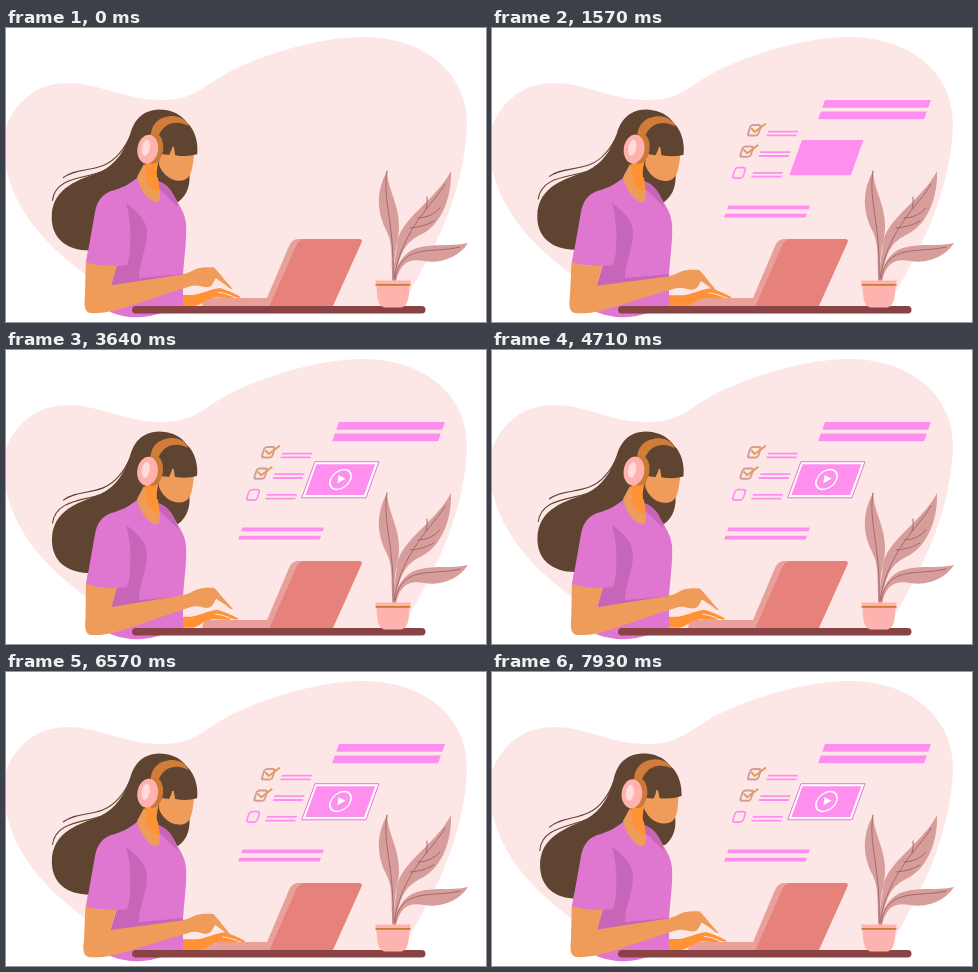
These frames come from a looping animation (480x294 px, 8 s). An HTML page:

```html
<!DOCTYPE html>
<html lang="en">
<head>
<meta charset="utf-8">
<title>Working at a laptop</title>
<style>
  html, body { margin: 0; width: 100%; height: 100%; overflow: hidden; background: #fff; }
  svg { display: block; width: 100vw; height: 100vh; }
  .skin { fill: #ef9c5a; }
  .hair { fill: #5f4531; }
  .shirt { fill: #df77d0; }
  .shade { fill: #c766b9; }
  .bright { fill: #ff9234; }
  .pink { fill: #ff8fee; }
  .leaf { fill: #d79d9b; }
  .vein { fill: none; stroke: #a4696b; stroke-linecap: round; }
  .strand { fill: none; stroke: #5f4531; stroke-width: 1.1; }
  .tick { fill: none; stroke: #e59c55; stroke-width: 2; stroke-linecap: round; stroke-linejoin: round; }
</style>
</head>
<body>
<svg viewBox="0 0 480 294" preserveAspectRatio="none">
  <path fill="#fde7e6" d="M-2 106C2 88 20 55 62 55C95 55 120 73 158 72C196 71 198 52 245 34C285 18 325 9 357 9C415 9 461 42 461 96C460 136 447 182 427 220C418 238 408 258 395 279H130C105 265 90 256 80 247C45 221 14 190 2 148C-2 134 -4 118 -2 106Z"/>

  <g id="board"></g>
  <path id="frame" fill="#fff" stroke="#df77d8" d="M309 111.7H373L360 147.8H295.7Z"/>
  <path id="panel" class="pink"/>
  <g id="play">
    <circle r="10" transform="skewX(-20)" fill="none" stroke="#fff" stroke-width="1.5"/>
    <path fill="#fff" d="M-2 -4.500L5 -.8L-3 3.700Z"/>
  </g>

  <path fill="#e9a09b" d="M196 279Q196 270 203 270H261L283 218Q286 211 292 211H305L275 279Z"/>
  <path fill="#e6817c" d="M263 279L290 218Q293 211 299 211H353Q357 211 355.500 214.500L326.500 279Z"/>

  <g data-head>
    <path class="hair" d="M153 81.500C134 82 127 95 124 106C118 124 110 136 95 144C75 152 46 159 46 190C46 211 61 223 84 223C113 222 135 200 146 173L172 174C182 167 185 155 183 142L189 110C181 89 170 82 153 81.500Z"/>
    <path class="strand" d="M57 150.500C73 138 96 147 113 126Q120 118 125 106M46.500 173.500C49 152 73 151 90 146Q112 140 121 117"/>
  </g>

  <g id="backHand">
    <path class="bright" d="M165 267L188 267C197 266 203 262 215 260C219 261 229 265 235.500 268.500Q236 270.500 232 269.500L217 265C223 267 227 268 229 269.500C223 271 214 269 208 270C200 271 197 278 188 278H165Z"/>
    <path fill="none" stroke="#fde7e6" d="M213 264.500Q218 264.500 227 268"/>
  </g>

  <path class="shirt" d="M131 150C122 157 114 161 105 163C95 167 91 174 89 184L80 235Q98 239 111 237L104 260V284Q128 294 156 285H177V248C178 230 181 211 180 196C179 184 173 177 168 168C164 161 160 156 152 153Z"/>
  <path class="shade" d="M120 175C131 183 142 193 141 207C140 224 133 235 133 250L177 246V251L104 260L111 237L122 235C126 214 125 193 120 175Z"/>
  <path class="shade" d="M152 153C164 157 169 167 172 179C166 173 158 165 152 160Z"/>
  <path class="skin" d="M131 149L138 136L152 150L154 167Q154 174 150 174.500C142 173 134 162 131 149Z"/>
  <path class="bright" d="M139 132H153Q149 145 152 153Q154 158 153 163C145 163 140 155 140 146Z"/>

  <g data-head>
    <path class="skin" d="M153 118L188 120C188 128 187 135 186 140C184 149 180 153 172 152.500C163 152 156 145 153 137Z"/>
    <path class="hair" d="M151 99C159 91 177 90 184 98C190 106 192 117 191 126Q181 129 169 127L167 115Q166 122 163 127L155 126Z"/>
    <path fill="#d17c38" d="M144.500 108C145 94 155 88 167 88Q179 89 182 98C173 92 157 93 152 109Z"/>
    <ellipse fill="#cb7936" cx="148" cy="121" rx="9" ry="15" transform="rotate(7 148 121)"/>
    <ellipse fill="#ffb1ad" cx="141.500" cy="121.200" rx="10.300" ry="14.500" transform="rotate(8 141.500 121.200)"/>
    <ellipse fill="#ffdcd9" cx="139.600" cy="120" rx="4" ry="8" transform="rotate(10 139.600 120)"/>
  </g>

  <path id="frontArm" class="skin" d="M80 234Q97 239 111 237L105.500 257.500L177 247Q184 245 189 242C196 239 204 240 208 240C213 245 218 252 227 262Q224 262 220 258L210 251C207 255 207 260 200 260C194 259 190 257 184 259C159 266 130 277 111 282C101 285 91 285.500 84 285C78 284 78 276 79 268Z"/>
  <path class="shirt" d="M80 234L82 222H124L121 237Q99 240 80 234Z"/>
  <rect x="126" y="278" width="293.500" height="7.600" rx="3.800" fill="#8a4345"/>

  <path class="leaf" d="M387 253C384 234 388 218 381 204C370 184 370 163 381 143C382 163 394 177 393 201C392 215 386 229 389 253Z"/>
  <path class="leaf" d="M387 252C387 237 390 228 391 215C394 191 430 172 445 143C446 168 436 196 416 206C399 214 394 224 389 252Z"/>
  <path class="leaf" d="M388 253C390 236 398 224 411 220C428 215 444 219 462 215C452 230 434 236 418 233C402 230 394 236 390 253Z"/>
  <path class="vein" d="M381 143C376 172 389 196 387 252M439 156C428 176 396 200 388 250M454 219C427 226 394 214 389 252"/>
  <path class="vein" d="M404 200Q418 199 428 193M412 190Q425 190 434 180M420 181Q422 174 421 169"/>
  <path fill="#ffb3ae" d="M369 252.500H405L403.500 258C403 270 402 279.500 394 279.500H380C372 279.500 371 270 370.500 258Z"/>
  <path fill="#c97a36" d="M369.500 256H404.500V257.800H369.500Z"/>
</svg>

<script>
const LOOP = 8000;
const LEAN = .36;
const $ = id => document.getElementById(id);
const heads = document.querySelectorAll('[data-head]');
const clamp = v => Math.max(0, Math.min(1, v));
const mix = (a, b, v) => a + (b - a) * v;
const wave = (t, period, start) => Math.sin((t - start) / period * 2 * Math.PI);
const slant = (x, y, w, h) => `M${x} ${y}h${w}l${-h * LEAN} ${h}h${-w}Z`;

function progress(t, start, length) {
  const v = clamp((t - start) / length);
  return v * v * (3 - 2 * v);
}

function make(tag, attrs) {
  const node = document.createElementNS('http://www.w3.org/2000/svg', tag);
  for (const name in attrs) node.setAttribute(name, attrs[name]);
  return $('board').appendChild(node);
}

const bars = [];
const rows = [];

function addPair(x, y, w, h, pitch, start) {
  for (let i = 0; i < 2; i++) {
    const node = make('path', { class: 'pink' });
    bars.push({ x: x - i * pitch * LEAN, y: y + i * pitch, w, h, start: start + i * 100, node });
  }
}

function addRow(i) {
  const x = 262.3 - 7.6 * i, y = 102.3 + 21.3 * i, start = 400 + 200 * i, done = i < 2;
  addPair(x + 14, y + .4 - .7 * i, 30, 1.8, 3.8, start);
  const box = make('rect', {
    x: -5.2, y: -5.2, width: 10.4, height: 10.4, rx: 2.5, fill: 'none',
    stroke: done ? '#d49d99' : '#ff8fee', 'stroke-width': done ? 2 : 1.7
  });
  const tick = done && make('path', {
    class: 'tick', d: `M${x - 2.5} ${y - 1.5}l3 3.2L${x + 11} ${y - 6.3}`,
    pathLength: 20, 'stroke-dasharray': 20
  });
  rows.push({ x, y, start, box, tick });
}

addPair(333, 72, 106, 7.8, 11.5, 100);
for (let i = 0; i < 3; i++) addRow(i);
addPair(236.5, 177.5, 81.5, 3.8, 8.3, 950);

function drawBoard(t) {
  for (const { x, y, w, h, start, node } of bars)
    node.setAttribute('d', slant(x, y, w * progress(t, start, 480), h));

  for (const { x, y, start, box, tick } of rows) {
    box.setAttribute('transform', `translate(${x} ${y}) skewX(-18) scale(${progress(t, start, 300)})`);
    if (!tick) continue;
    const drawn = progress(t, start + 350, 350);
    tick.setAttribute('stroke-dashoffset', 20 * (1 - drawn));
    tick.setAttribute('opacity', Math.sign(drawn));
  }

  const shown = progress(t, 1000, 450), inset = progress(t, 1600, 400);
  $('panel').setAttribute('d', slant(mix(310, 310.5, inset), mix(112, 114.3, inset),
    mix(61.5, 58.7, inset) * shown, mix(35.2, 30.8, inset)));
  $('frame').setAttribute('opacity', inset);
  $('play').setAttribute('transform', `translate(334.5 129.5) scale(${progress(t, 1950, 350)})`);
}

function drawWoman(t) {
  // A gentle nod that ends with the head leaning back.
  const tilt = .6 + .6 * wave(t, 4200, 200) - 3.3 * clamp((t - 6000) / 2000) ** 2;
  for (const head of heads) head.setAttribute('transform', `rotate(${tilt} 152 152)`);

  // The hands slide in opposite directions.
  const reach = 3.7 * wave(t, 5050, 200) - .3;
  $('backHand').setAttribute('transform', `translate(${reach} ${reach * .1})`);
  $('frontArm').setAttribute('transform', `translate(${-reach * .22 - .3} 0) rotate(${reach * .27} 82 268)`);
}

const origin = performance.now();
function tick() {
  const t = (performance.now() - origin) % LOOP;
  drawBoard(t);
  drawWoman(t);
  requestAnimationFrame(tick);
}
tick();
</script>
</body>
</html>
```
